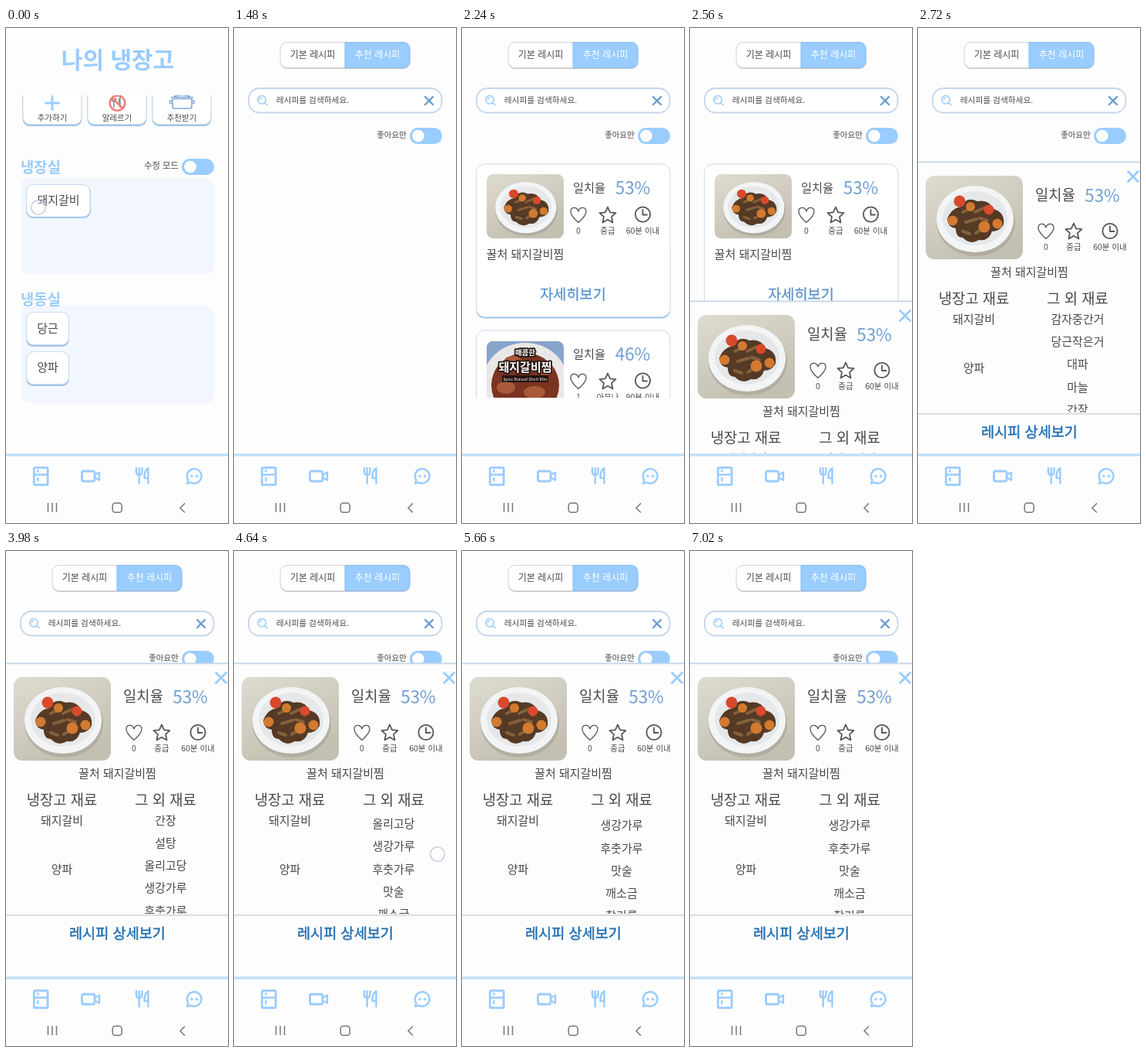
Animation of 288 by 640 pixels, one loop 7090 ms. Source, as an HTML page:

```html
<!DOCTYPE html>
<html lang="ko">
<head>
<meta charset="utf-8">
<title>나의 냉장고</title>
<style>
html, body { margin: 0; width: 100%; height: 100%; overflow: hidden; background: #fdfdfd; }
svg { display: block; width: 288px; height: 640px; }
text { font-family: "Noto Sans CJK KR", "Noto Sans CJK", "Noto Sans KR", sans-serif; text-anchor: middle; fill: #4a4a4e; }
.page { fill: #fdfdfd; }
.blue { fill: #9cf; }
.line { fill: none; stroke: #9cf; stroke-width: 2.8; stroke-linecap: round; stroke-linejoin: round; }
.thin { stroke-width: 1.5; }
.dark { fill: none; stroke: #55555a; stroke-width: 1.8; stroke-linejoin: round; stroke-linecap: round; }
.sys { fill: none; stroke: #77777c; stroke-width: 1.5; }
.head { font-size: 18.8px; font-weight: 700; fill: #9cf; }
.title { font-size: 30px; font-weight: 700; fill: #9cf; }
.item { font-size: 15px; }
.tiny { font-size: 10.5px; }
.big { font-size: 18.8px; }
.tab { font-size: 12px; }
.rate { font-size: 22.5px; fill: #6f9fd3; }
.link { font-size: 18.6px; fill: #5b93cf; stroke: #5b93cf; stroke-width: .3; }
.strong { fill: #2470b5; stroke: #2470b5; stroke-width: .5; }
.white { fill: #fff; }
.box { fill: #fff; stroke: #c9dbf0; stroke-width: 1; }
.edge { fill: #a3c4ea; }

.fridge, .basic, .list, .panel, .scroll, .touch { animation: 7090ms step-end infinite; }
.fridge { animation-name: leave; }
.basic { animation-name: pick; }
.list { animation-name: load; }
.panel { animation-name: rise; }
.scroll { animation-name: scroll; }
.touch { animation-name: touch; fill: #fff; fill-opacity: .35; stroke: #b4bad4; stroke-width: 1.1; }

@keyframes leave { 0% { opacity: 1 } 7.898%, 100% { opacity: 0 } }
@keyframes pick { 0% { opacity: 1 } 16.643%, 100% { opacity: 0 } }
@keyframes load { 0% { opacity: 0 } 23.13%, 100% { opacity: 1 } }
@keyframes rise {
  0% { transform: translateY(640px) }
  33.15% { transform: translateY(560px) }
  34.27% { transform: translateY(463px) }
  35.26% { transform: translateY(353px) }
  36.38% { transform: translateY(281px) }
  37.37% { transform: translateY(226px) }
  38.36% { transform: translateY(173px) }
  39.49% { transform: translateY(154px) }
  40.62%, 100% { transform: translateY(145px) }
}
@keyframes scroll {
  0%, 44% { transform: translateY(0) }
  45.13% { transform: translateY(-4px) }
  46.26% { transform: translateY(-16.5px) }
  47.39% { transform: translateY(-45px) }
  48.52% { transform: translateY(-66px); animation-timing-function: steps(3) }
  51.9% { transform: translateY(-102px); animation-timing-function: steps(4) }
  56.41% { transform: translateY(-122px) }
  63.18% { transform: translateY(-122px) }
  64.31% { transform: translateY(-152px) }
  65.44% { transform: translateY(-171px) }
  66.57% { transform: translateY(-184px) }
  67.7% { transform: translateY(-193px) }
  68.83% { transform: translateY(-197px) }
  69.95%, 100% { transform: translateY(-198px) }
}
@keyframes touch {
  0% { transform: translate(42px, 232px); opacity: 1 }
  1.128% { transform: translate(42px, 232px); opacity: 0 }
  5.64% { transform: translate(177px, 580px); opacity: 1 }
  7.898% { transform: translate(177px, 580px); opacity: 0 }
  15.51% { transform: translate(186px, 36px); opacity: 1 }
  16.643% { transform: translate(186px, 36px); opacity: 0 }
  28.2% { transform: translate(144px, 344px); opacity: 1 }
  30.46% { transform: translate(144px, 344px); opacity: 0 }
  44% { transform: translate(232px, 445px); opacity: 1 }
  45.13% { transform: translate(236px, 441px); opacity: 1 }
  46.26% { transform: translate(241px, 429px); opacity: 1 }
  47.39% { transform: translate(258px, 400px); opacity: 1 }
  48.52% { transform: translate(275px, 379px); opacity: 1 }
  49.65% { transform: translate(275px, 379px); opacity: 0 }
  62.06% { transform: translate(232px, 441px); opacity: 1 }
  64.31% { transform: translate(248px, 411px); opacity: 1 }
  65.44% { transform: translate(264px, 392px); opacity: 1 }
  66.57% { transform: translate(275px, 379px); opacity: 1 }
  67.7% { transform: translate(283px, 370px); opacity: 1 }
  68.83%, 100% { transform: translate(283px, 370px); opacity: 0 }
}
</style>
</head>
<body>
<svg viewBox="0 0 288 640" xmlns="http://www.w3.org/2000/svg">
<defs>
  <linearGradient id="wall" x2=".5" y2="1">
    <stop offset="0" stop-color="#dedccf"/><stop offset="1" stop-color="#c3c0b2"/>
  </linearGradient>
  <clipPath id="listClip"><rect y="172" width="288" height="306"/></clipPath>
  <clipPath id="menuClip"><rect y="87" width="288" height="60"/></clipPath>
  <clipPath id="itemClip"><rect x="150" y="193" width="120" height="131"/></clipPath>
  <clipPath id="photoClip"><rect width="126" height="108" rx="11"/></clipPath>
  <clipPath id="stewClip"><rect width="100" height="83" rx="8"/></clipPath>

  <g id="dish" clip-path="url(#photoClip)">
    <rect width="126" height="108" fill="url(#wall)"/>
    <ellipse cx="65" cy="60" rx="51" ry="44" fill="#a5a296" opacity=".6"/>
    <ellipse cx="64" cy="56" rx="50" ry="43" fill="#f3f4f6"/>
    <ellipse cx="64" cy="55" rx="42" ry="35" fill="#e6e7e9"/>
    <path d="M28 56Q33 42 46 40Q53 26 67 33Q82 30 88 43Q103 47 101 63Q96 72 86 72Q82 85 69 83Q58 90 48 80Q39 80 39 68Q29 67 28 56Z" fill="#553a25"/>
    <path d="M48 47l11-5M64 47l13-6M52 60l14-4M70 55l10 3M48 72l9 3M65 74l8-5" stroke="#84603c" stroke-width="4" stroke-linecap="round"/>
    <g fill="#d27a30">
      <circle cx="35" cy="58" r="6.5"/><circle cx="58" cy="40" r="6"/>
      <circle cx="76" cy="66" r="7.5"/><circle cx="93" cy="62" r="6.5"/>
    </g>
    <g fill="#d9492c"><circle cx="44" cy="33" r="7.5"/><circle cx="82" cy="44" r="6.5"/></g>
  </g>

  <g id="stew" clip-path="url(#stewClip)">
    <rect width="100" height="83" fill="#86a5cb"/>
    <ellipse cx="50" cy="52" rx="55" ry="50" fill="#e9e7e7"/>
    <ellipse cx="50" cy="57" rx="44" ry="42" fill="#7a3420"/>
    <g fill="#a95a38">
      <ellipse cx="25" cy="60" rx="12" ry="8"/><ellipse cx="62" cy="66" rx="14" ry="8"/>
      <ellipse cx="76" cy="36" rx="10" ry="8"/><ellipse cx="34" cy="25" rx="11" ry="6"/>
    </g>
    <g stroke="#241512" stroke-width="3.5" paint-order="stroke" stroke-linejoin="round" font-weight="700">
      <text class="white" x="50" y="18" font-size="9.5">매콤한</text>
      <text class="white" x="50" y="39" font-size="15">돼지갈비찜</text>
    </g>
    <rect x="20" y="44" width="60" height="9" fill="#241512"/>
    <text class="white" x="50" y="50.5" font-size="5">Spice Braised Short Ribs</text>
  </g>

  <g id="heart" class="dark"><path d="M0 9.5C-4 6-10-.5-10-4.5C-10-11-2-11.5 0-5C2-11.5 10-11 10-4.5C10-.5 4 6 0 9.5Z" stroke-width="1.3"/></g>
  <g id="star" class="dark"><path d="M0-10.5L3.1-3.7L10.5-2.9L5 2.1L6.5 9.5L0 5.8L-6.5 9.5L-5 2.1L-10.5-2.9L-3.1-3.7Z"/></g>
  <g id="clock" class="dark"><circle r="9.6"/><path d="M0-6V.5H5.5"/></g>
  <g id="switch">
    <rect class="blue" width="42" height="21" rx="10.5"/>
    <circle class="white" cx="11" cy="10.5" r="7.8"/>
  </g>
  <g id="menuBox">
    <rect class="edge" x="-38.5" y="70" width="77" height="57" rx="9"/>
    <rect class="box" x="-38" y="68" width="76" height="56.5" rx="9"/>
  </g>
  <g id="wide">
    <rect class="edge" x="18.3" y="100" width="251.9" height="100" rx="11"/>
    <rect class="box" x="18.5" y=".5" width="251.5" height="197.5" rx="11"/>
  </g>
  <g id="chip">
    <rect class="edge" x="26" y="1" width="56" height="44" rx="9"/>
    <rect class="box" x="26.5" y=".5" width="55" height="42" rx="9"/>
  </g>
</defs>

<rect class="page" width="288" height="640"/>

<g>
  <rect x="60" y="20" width="168.5" height="33" rx="9" fill="#c9cbd0"/>
  <rect x="60" y="18.5" width="168" height="33" rx="9" fill="#fff" stroke="#d2d4d8"/>
  <path class="blue" d="M144 18.5H219Q228 18.5 228 27.5V42.5Q228 51.5 219 51.5H144Z" stroke="#8bbdf0"/>
  <text class="tab" x="102" y="39">기본 레시피</text>
  <text class="tab white" x="186" y="39">추천 레시피</text>
  <g class="basic">
    <rect x="60" y="18.5" width="168" height="33" rx="9" fill="#fff" stroke="#d2d4d8"/>
    <path class="blue" d="M144 18.5H69Q60 18.5 60 27.5V42.5Q60 51.5 69 51.5H144Z" stroke="#8bbdf0"/>
    <text class="tab white" x="102" y="39">기본 레시피</text>
    <text class="tab" x="186" y="39">추천 레시피</text>
  </g>

  <rect x="19" y="78" width="250.5" height="31.5" rx="14" fill="#fff" stroke="#c5d5ec" stroke-width="1.8"/>
  <circle class="line thin" cx="36" cy="92.8" r="5.3"/>
  <path class="line thin" d="M40 96.8L43 99.6M33.2 92.5Q33.7 90.4 35.6 90"/>
  <text x="102" y="97" font-size="10.7">레시피를 검색하세요.</text>
  <path d="M248 89L258 99M258 89L248 99" stroke="#6a9dd2" stroke-width="2.4" stroke-linecap="round"/>
  <text class="tiny" x="204.5" y="142">좋아요만</text>
  <use href="#switch" x="228" y="129"/>
</g>

<g clip-path="url(#listClip)">
  <g class="list">
    <use href="#wide" y="175.5"/>
    <use href="#dish" transform="translate(32 189) scale(.794 .77)"/>
    <text x="165" y="212" font-size="15.3">일치율</text>
    <text class="rate" x="221.5" y="215">53%</text>
    <use href="#heart" x="151" y="242"/><use href="#star" x="189" y="242"/><use href="#clock" x="234.5" y="241"/>
    <text class="tiny" x="151" y="266">0</text>
    <text class="tiny" x="189" y="266">중급</text>
    <text class="tiny" x="234.5" y="266">60분 이내</text>
    <text class="item" x="82" y="298">꿀처 돼지갈비찜</text>
    <text class="link" x="144" y="350.5">자세히보기</text>

    <use href="#wide" y="390.5"/>
    <use href="#stew" x="32" y="405"/>
    <text x="165" y="427" font-size="15.3">일치율</text>
    <text class="rate" x="221.5" y="430">46%</text>
    <use href="#heart" x="151" y="457"/><use href="#star" x="189" y="457"/><use href="#clock" x="234.5" y="456"/>
    <text class="tiny" x="151" y="481">1</text>
    <text class="tiny" x="189" y="481">아무나</text>
    <text class="tiny" x="234.5" y="481">90분 이내</text>
  </g>
</g>

<g class="panel">
  <rect class="page" width="288" height="500"/>
  <rect width="288" height="1.8" y="-.5" fill="#c3d6ea"/>
  <path class="line" d="M272.5 12.5L285.5 25.5M285.5 12.5L272.5 25.5"/>
  <use href="#dish" x="10" y="18"/>
  <text class="big" x="178" y="49.5">일치율</text>
  <text class="rate" x="239" y="52">53%</text>
  <use href="#heart" x="166" y="90"/><use href="#star" x="202" y="90"/><use href="#clock" x="249" y="89.5"/>
  <text class="tiny" x="166" y="114">0</text>
  <text class="tiny" x="202" y="114">중급</text>
  <text class="tiny" x="249" y="114">60분 이내</text>
  <text class="item" x="144.5" y="147.5">꿀처 돼지갈비찜</text>
  <text class="big" x="72.5" y="183.5">냉장고 재료</text>
  <text class="big" x="207" y="183.5">그 외 재료</text>
  <text class="item" x="72.5" y="209">돼지갈비</text>
  <text class="item" x="72.5" y="272">양파</text>
  <g clip-path="url(#itemClip)"><g class="scroll" id="items"></g></g>
  <rect y="325" width="288" height="1.6" fill="#d3d6db"/>
  <text class="link strong" x="144.5" y="356">레시피 상세보기</text>
</g>

<g class="fridge">
  <rect class="page" width="288" height="550"/>
  <text class="title" x="145" y="52">나의 냉장고</text>
  <g clip-path="url(#menuClip)">
    <use href="#menuBox" x="60"/><use href="#menuBox" x="144"/><use href="#menuBox" x="228"/>
    <path class="line" d="M51.5 97H68.5M60 88.5V105.5"/>
    <path d="M140 91V103M137.5 90V94Q140 97 142.5 94V90M148 103V90Q145 94 148 98" fill="none" stroke="#8a8a90" stroke-width="1.5"/>
    <g fill="none" stroke="#ee7d78" stroke-width="2.5"><circle cx="144.5" cy="97" r="9.8"/><path d="M137.5 90L151.5 104"/></g>
    <path d="M216 91.5H241V101Q241 104 238 104H219Q216 104 216 101ZM214 89.5H243M216 94H212.5V97H216M241 94H244V97H241M218 88.5Q228 85 239 88.5" fill="none" stroke="#85abd8" stroke-width="1.6"/>
  </g>
  <text class="tiny" x="60" y="119.5">추가하기</text>
  <text class="tiny" x="144" y="119.5">알레르기</text>
  <text class="tiny" x="228" y="119.5">추천받기</text>

  <rect x="19" y="194" width="251" height="125" rx="11" fill="#f2f7ff"/>
  <rect x="19" y="359" width="251" height="126" rx="11" fill="#f2f7ff"/>
  <text class="head" x="45" y="187">냉장실</text>
  <text class="head" x="45" y="358">냉동실</text>
  <text x="201.5" y="182" font-size="11.3">수정 모드</text>
  <use href="#switch" x="228" y="169"/>
  <rect class="edge" x="26" y="203" width="84" height="43" rx="9"/>
  <rect class="box" x="26.5" y="202.5" width="82.5" height="41.5" rx="9"/>
  <text class="item" x="68" y="228">돼지갈비</text>
  <use href="#chip" y="367"/><text class="item" x="54" y="394">당근</text>
  <use href="#chip" y="418"/><text class="item" x="54" y="444">양파</text>
</g>

<rect class="page" y="550" width="288" height="90"/>
<rect y="550.3" width="288" height="3.4" fill="#bfe0fb"/>
<g class="line">
  <rect x="36.3" y="568.3" width="17.8" height="22.4" rx="1.5"/>
  <path d="M37 577.5H53.5M41.3 572V573.3M41.3 582V585" stroke-width="2.4"/>
  <rect x="98.5" y="573" width="16.5" height="13" rx="2.5"/>
  <path d="M115.5 577.5L121 574.5V584.5L115.5 581.5" stroke-width="2.4"/>
  <path d="M169 569V573Q169 578 172.7 578Q176.5 578 176.5 573V569M172.7 569V589M184.5 589V569Q179 573 179.5 582H184" stroke-width="2.4"/>
  <path d="M236.5 584.5A9.3 9.3 0 1 1 240 587.6L235 588.8Z" stroke-width="2.5"/>
</g>
<g class="blue"><circle cx="241" cy="579.5" r="1.7"/><circle cx="247.5" cy="579.5" r="1.7"/></g>
<g class="sys">
  <path d="M54.5 614V626M60 614V626M65.5 614V626M232 614.5L226 620.5L232 626.5"/>
  <rect x="138.2" y="614.2" width="12" height="12" rx="3.5"/>
</g>

<circle class="touch" r="9.3"/>
</svg>
<script>
const names = ["감자중간거", "당근작은거", "대파", "마늘", "간장", "설탕",
  "올리고당", "생강가루", "후춧가루", "맛술", "깨소금", "참기름"];
document.getElementById("items").innerHTML = names
  .map((name, i) => `<text class="item" x="207" y="${209 + i * 29.2}">${name}</text>`)
  .join("");
</script>
</body>
</html>
```
